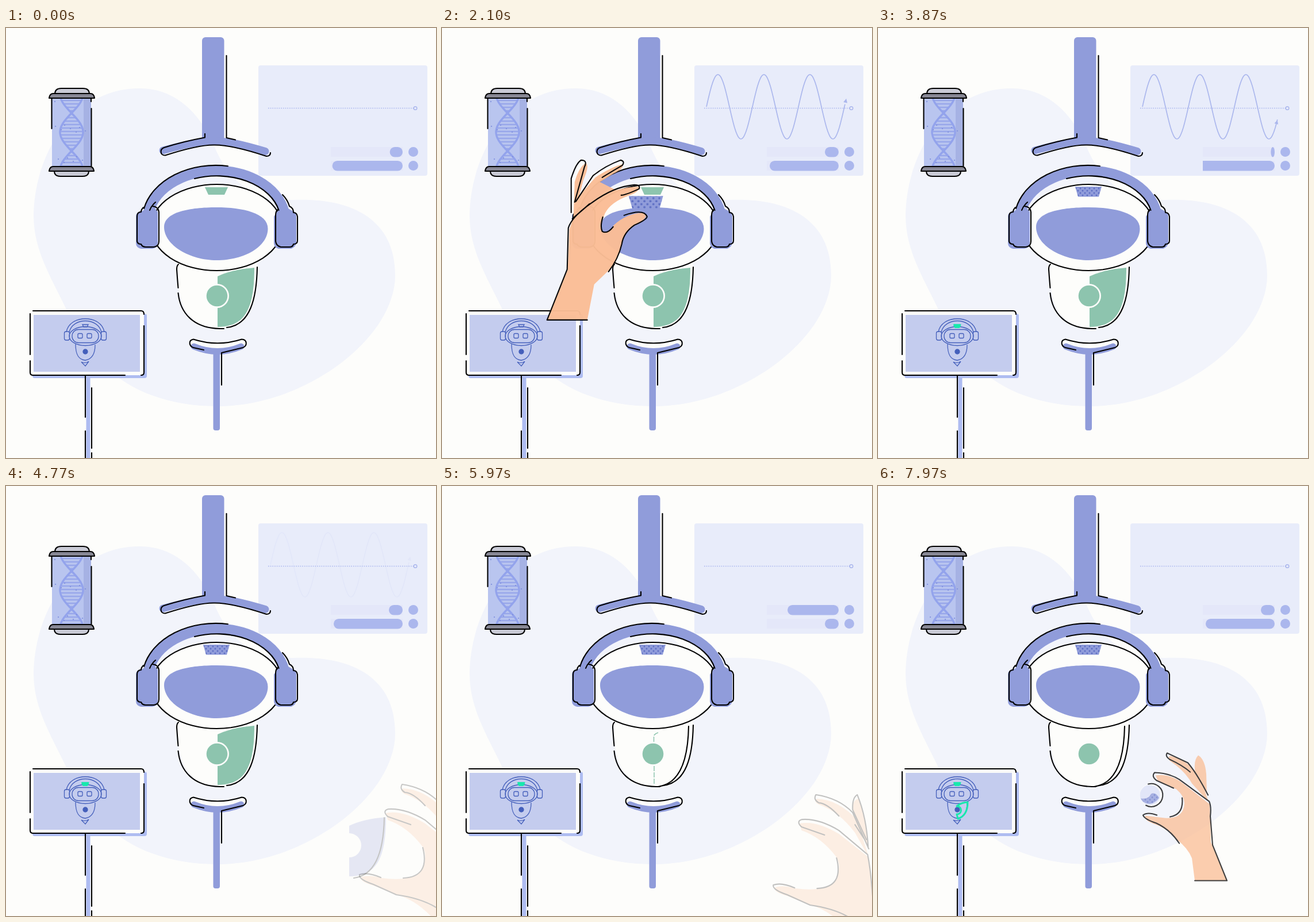
Recreate the animation shown at these times as an HTML page. Size 748 px wide and 748 px high, loop 8 s.

```html
<!DOCTYPE html>
<html lang="en">
<head>
<meta charset="utf-8">
<title>Robot assembly</title>
<style>
  html, body { margin: 0; width: 100%; height: 100%; overflow: hidden; background: #fdfdfb; }
  svg { display: block; width: 100vw; height: 100vh; }
  .ink { fill: none; stroke: #000; stroke-width: 2.1; stroke-linecap: round; stroke-linejoin: round; }
  .blue { fill: #909cda; }
  .band { fill: none; stroke: #909cda; stroke-linecap: round; }
  .green { fill: #8dc4ae; }
  .paper { fill: #fdfdfb; }
  .skin { fill: #fbbe96; }
  .bar { fill: #abb7ed; }
  .track { fill: #e4e7f9; }
  .mini { fill: none; stroke: #445fbb; stroke-width: 1.3; }
  .lit { fill: none; stroke: #18e8ad; stroke-width: 3; stroke-linejoin: round; }
</style>
</head>
<body>
<svg viewBox="0 0 748 748" preserveAspectRatio="none">
  <defs>
    <pattern id="dots" width="8" height="8" patternUnits="userSpaceOnUse">
      <rect width="8" height="8" fill="#909cda"/>
      <circle cx="2" cy="2" r="1.5" fill="#5f70c4"/><circle cx="6" cy="6" r="1.5" fill="#5f70c4"/>
    </pattern>
    <clipPath id="trackClip"><path d="M565 200H690V255H565Z"/></clipPath>
    <clipPath id="glassClip"><path d="M80 122H148V241H80Z"/></clipPath>
  </defs>

  <path fill="#f2f4fb" d="M232 105C296 105 338 150 362 205C384 258 420 300 500 299C590 295 677 325 677 430C677 540 520 658 368 658C230 658 150 590 110 500C80 435 48 390 48 325C50 215 120 105 232 105Z"/>

  <g id="panel">
    <rect x="439" y="65" width="294" height="192" rx="4" fill="#e8ecfa"/>
    <path d="M456 139.5H709" stroke="#abb7ed" stroke-width="1.5" stroke-dasharray="1.7 2"/>
    <circle cx="712" cy="139.5" r="2.8" fill="#e8ecfa" stroke="#abb7ed" stroke-width="1.5"/>
    <g id="wave" fill="none" stroke="#abb7ed" stroke-width="1.7">
      <path id="curve" pathLength="1" stroke-dasharray="1 2"/>
      <path id="arrow" d="M0 -2L-3.5 5H3.5Z" fill="#abb7ed" stroke="none"/>
    </g>
    <path class="track" d="M565 207H690V224H565ZM565 231H690V248H565Z"/>
    <g class="bar" clip-path="url(#trackClip)">
      <rect id="barTop" y="207" height="17.5" rx="8.7"/>
      <rect id="barLow" y="231" height="17.5" rx="8.7"/>
    </g>
    <circle class="bar" cx="708.5" cy="215.5" r="8.5"/>
    <circle class="bar" cx="708.5" cy="239.5" r="8.5"/>
  </g>

  <g id="vial">
    <rect x="80" y="122" width="68" height="119" fill="#b9c5ef"/>
    <rect x="135" y="122" width="13" height="119" fill="#a6b2e4"/>
    <g clip-path="url(#glassClip)">
      <path id="rungs" stroke="#98a7ea" stroke-width="2.3"/>
      <path id="helixA" fill="none" stroke="#93a3ec" stroke-width="3.4"/>
      <path id="helixB" fill="none" stroke="#93a3ec" stroke-width="3.4"/>
      <path id="specks" stroke="#7f8fde" stroke-width="2.2" stroke-linecap="round"/>
    </g>
    <path class="ink" d="M79.500 122V175M148 123V128M148.500 140V240"/>
    <g class="ink">
      <path fill="#c9cad5" d="M85 115Q85 105 96 105H134Q145 105 145 115ZM84 249Q84 258 95 258H133Q144 258 144 249Z"/>
      <path fill="#878794" d="M75 122Q76 114 82 114H147Q153 114 154 122ZM75 249Q76 241 82 241H146Q152 241 153 249Z"/>
    </g>
  </g>

  <g id="lamp">
    <rect class="blue" x="341" y="16" width="38.500" height="182" rx="6"/>
    <path class="band" stroke-width="13" d="M273 213Q335 196 362 196.500Q390 196 451 214.500"/>
    <path class="ink" d="M383.500 48V191L399 194.500M346 184V190.500Q310 197 275 208C267 211 268 222 277 221.500Q335 203 362 203.500Q392 203 453 223Q460 223 460 217"/>
  </g>

  <g id="base">
    <rect class="blue" x="360.500" y="560" width="11.500" height="140" rx="4"/>
    <path class="paper" d="M326 541Q368 555 410 541Q422 546 413 557H326Q315 551 326 541Z"/>
    <path class="band" stroke-width="11" d="M327 554Q368 571 409 554"/>
    <path class="ink" d="M344 560L326 556C318 553 317 543 326 541.500Q368 555 410 541.500C420 542 420 553 412 556L375 565V621"/>
  </g>

  <g id="robot">
    <path class="paper" d="M298 405C298 475 310 523 375 523C425 521 437 475 437 405Z"/>
    <path class="green" id="socket" d="M368 432Q393 420 432 417C432 490 415 520 368 520Z"/>
    <path class="ink" d="M300 411Q297 413 297 420Q298 435 299.500 452M299.500 461C303 495 325 522 372 523L379 523M384 521C425 517 436 470 437 416"/>
    <g id="piece">
      <path id="pieceFill" d="M368 432Q393 420 432 417C432 490 415 520 368 520V487A21 21 0 0 0 368 445Z"/>
      <path class="ink" d="M429 418C428 475 415 518 376 523"/>
    </g>
    <path id="sliver" stroke="#8dc4ae" stroke-width="1.500" stroke-dasharray="9 2" fill="none" d="M376 429Q368 432 368.500 436V446M369 487V520"/>
    <circle class="paper" cx="367" cy="466" r="21"/>
    <circle class="green" cx="367" cy="466" r="18.300"/>

    <path class="band" stroke-width="18" stroke-linecap="butt" d="M247 327A119.500 86.500 0 0 1 485 327"/>
    <ellipse class="ink" cx="366.500" cy="347" rx="114" ry="75" style="fill:#fdfdfb"/>
    <path class="blue" d="M275 346C275 320 320 312 366 312C412 312 455.500 322 455.500 349C455.500 380 415 404 366 404C320 404 275 378 275 346Z"/>
    <path class="green" d="M346 277H386L380 290H352Z"/>
    <rect class="paper" x="228" y="320" width="38" height="60" rx="8"/>
    <rect class="paper" x="469" y="320" width="38" height="60" rx="8"/>
    <path class="blue" d="M238 318L246 311H257L264 320V374Q264 383 254 384H235Q226 382 226 374V326Q228 319 238 318ZM470 322L477 313H489L498 318Q505 320 505 328V374Q504 381 496 384H474Q467 382 466 375V328Z"/>
    <path class="ink" d="M260 303Q253 309 250 317M240 314A128 96 0 0 1 386 240.200M328 262A111 77 0 0 1 474.500 317M481 290Q490 299 493 310M239 312Q235 316 235 320Q228 320 228 328V371Q229 376 235 376Q237 381 243 381H257Q266 380 266 371V320Q265 311 255 310M474 315Q469 318 469 326V371Q470 379 478 381H493Q499 381 500 376Q507 376 507 370V328Q506 321 500 321Q500 313 493 310"/>
  </g>
  <g id="chip"><path fill="url(#dots)" d="M-23 -9H23L18 8.500H-18Z"/></g>

  <g id="screen">
    <path d="M143 606V748" stroke="#aebcf1" stroke-width="7"/>
    <rect x="46" y="497" width="199" height="112" rx="4" fill="#aebcf1"/>
    <rect class="paper" x="42" y="492" width="198" height="112" rx="4"/>
    <rect x="48" y="499" width="185" height="99" fill="#c4ccee"/>
    <path class="ink" d="M47 492H235Q240 492 240 498M240 518V599Q240 604 235 604M207 604H47Q42 604 42 599V579M42 568V497M138 604V677M138 701V748M149 626V731M149 739V748"/>
    <g class="mini">
      <path d="M105 529C110 498 166 498 171 529M110 529C116 503 160 503 166 529"/>
      <rect x="101.500" y="528" width="9" height="15" rx="3"/><rect x="165.500" y="528" width="9" height="15" rx="3"/>
      <ellipse cx="138" cy="536" rx="28" ry="16.500"/><rect x="115" y="524.500" width="46" height="23" rx="11"/>
      <rect x="125" y="531.500" width="8" height="8" rx="2"/><rect x="141" y="531.500" width="8" height="8" rx="2"/>
      <path d="M121 550C121 568 126 577 138 578C150 576 155 566 155 551M133 516H143L141 520H135ZM131 581Q138 584 144 580L138 588Z"/>
      <circle cx="138" cy="563" r="4" fill="#445fbb"/>
    </g>
    <path id="litChip" class="lit" style="fill:#18e8ad" d="M132.500 516.500H143L141 520.500H134.500Z"/>
    <path id="litPiece" class="lit" d="M137 557Q146 550 156 550Q156 573 139 579L137 571A7 7 0 0 0 138 557Z"/>
  </g>

  <g id="hand1">
    <path class="paper" d="M227 325V264L243 231L252 232L240 300L264 257L314 231L317 239L280 262L240 315Z"/>
    <path class="skin" d="M184 508L220 420L223 350L230 328L232 268Q240 240 252 235Q258 240 247 265L240 292L268 260Q295 242 315 237Q319 244 300 253L276 268L304 282Q325 276 343 276Q347 285 325 292Q295 303 285 322Q275 345 281 354Q291 357 300 343Q325 321 352 322Q365 329 335 344Q318 354 314 378Q306 405 294 419L266 446L254 508ZM238 305L270 270L302 282L260 306Z"/>
    <path class="ink" d="M254 508H184L219 420L221 348Q227 328 262 304Q300 276 336 273Q347 273 344 280Q320 291 313 291M226 321V262Q234 236 243 230Q255 230 249 242L232 303M234 302L264 257Q285 240 312 230Q320 232 315 239Q296 250 280 260M228 332L258 306M299 346Q289 359 280 354Q276 345 281 329M318 326Q352 314 358 328Q358 333 336 343Q317 356 314 376Q308 402 291 424"/>
  </g>

  <g id="hand2">
    <path class="skin" d="M740 628L714 562Q713 546 724 543Q735 570 742 625ZM742 645L718 602Q690 565 655 553Q645 547 652 543Q690 545 722 580ZM622 586Q650 580 690 604L742 645C750 700 745 730 760 760L790 828H722Q720 785 700 765Q670 735 640 728L600 712Q577 705 578 698Q590 692 615 699Q660 705 680 690Q697 665 686 645Q660 610 625 598Z"/>
    <path class="ink" d="M738 614L714 562Q713 541 722 536C732 560 739 590 741 628M718 588L735 614M690 573Q670 551 655 550Q645 544 650 536Q690 542 714 567L742 630M665 606L625 592Q615 582 626 579Q655 577 690 598L740 640C752 700 744 730 760 760L790 828H722M652 699Q699 697 686 646M613 698Q590 688 576 693Q574 701 600 710L640 728Q690 735 718 756"/>
  </g>

  <g id="hand3">
    <circle class="paper" cx="476" cy="538" r="20"/>
    <circle fill="#dde2f8" cx="474" cy="538" r="17.500"/>
    <path fill="url(#dots)" d="M458 544Q472 546 476 536Q484 532 490 543Q481 555 470 553Q461 551 458 544Z"/>
    <path class="ink" d="M471 519A20 20 0 1 1 467 556"/>
    <path class="skin" d="M573 537L553 500Q549 478 558 469Q570 476 572 502ZM576 550L547 518Q535 496 509 479Q503 471 510 470Q544 478 563 512ZM484 504Q510 500 533 519L578 554L580 620L608 687H552L547 648Q540 630 520 615Q505 596 480 588Q462 581 466 574L500 578Q532 580 534 553Q534 540 520 528L488 514Z"/>
    <path class="ink" d="M544 498Q530 486 508 476Q500 470 504 465L540 482Q556 501 575 538M515 526L486 513Q476 506 482 499Q510 500 528 513L577 549Q581 558 579 575L583 625L608 687H552M509 576Q533 572 530 543M486 573Q470 567 462 573Q464 580 485 587Q509 598 525 622"/>
  </g>
</svg>
<script>
const LOOP = 8000, PANEL_CYCLE = 2640;
const el = id => document.getElementById(id);
const set = (id, attrs) => { for (const k in attrs) el(id).setAttribute(k, attrs[k]); };
const ramp = (t, start, length) => Math.min(1, Math.max(0, (t - start) / length));
const easeInOut = p => p < .5 ? 2 * p * p : 1 - 2 * (1 - p) ** 2;
const move = (x, y) => `translate(${x.toFixed(2)} ${y.toFixed(2)})`;

function plot(from, to, step, point) {
  const points = [];
  for (let v = from; v <= to; v += step) points.push(point(v).map(n => n.toFixed(1)).join(' '));
  return 'M' + points.join('L');
}

const waveY = x => 137 - 56 * Math.sin((x - 460) * Math.PI / 40);
const spread = y => 20 * Math.cos((y - 181) * Math.PI / 66);

set('curve', { d: plot(460, 701, 1, x => [x, waveY(x)]) });
set('helixA', { d: plot(120, 243, 2, y => [114 + spread(y), y]) });
set('helixB', { d: plot(120, 243, 2, y => [114 - spread(y), y]) });
let rungs = '', specks = '';
for (let y = 126; y < 241; y += 6) rungs += `M${114 - spread(y)} ${y}L${114 + spread(y)} ${y}`;
for (let i = 0; i < 14; i++) specks += `M${85 + i * 37 % 58} ${128 + i * 53 % 108}h.1`;
set('rungs', { d: rungs });
set('specks', { d: specks });

// time within the panel cycle, slider position
const sliderKeys = [[0, -.025], [50, 0], [110, 0], [310, 1], [800, 1], [1200, -.27], [1600, 0], [PANEL_CYCLE, 0]];
function sliderAt(t) {
  const i = sliderKeys.findIndex(k => k[0] > t);
  const [t0, v0] = sliderKeys[i - 1], [t1, v1] = sliderKeys[i];
  return v0 + (v1 - v0) * easeInOut((t - t0) / (t1 - t0));
}

function drawPanel(time) {
  const t = time % PANEL_CYCLE, v = sliderAt(t);
  const drawn = ramp(t, 740, 510), x = 460 + 241 * drawn;
  const heading = Math.atan2(waveY(x + 1) - waveY(x), 1) * 180 / Math.PI + 90;
  set('wave', { opacity: drawn > 0 ? 1 - ramp(t, 2102, 32) : 0 });
  set('curve', { 'stroke-dashoffset': 1 - drawn });
  set('arrow', { transform: `${move(x, waveY(x))} rotate(${heading}) translate(0 -8)` });
  for (const [id, w] of [['barTop', 24 + 65 * v], ['barLow', 120 - 96 * v]])
    set(id, { x: 690 - w, width: w });
}

const hands = [
  { id: 'hand1', start: 1635, leave: 2720, dock: [10, -19], from: [-200, 335], to: [-243, 372] },
  { id: 'hand2', start: 4690, leave: 5720, dock: [-190, -176], from: [239, 166], to: [215, 200] },
  { id: 'hand3', start: 7680, leave: 8700, dock: [-108, -72], from: [232, 155], to: [215, 200] }
];

function drawHand(hand, t) {
  const away = 1 - easeInOut(ramp(t, hand.start, 560)), gone = ramp(t, hand.leave, 330);
  const back = easeInOut(gone), shown = ramp(t, hand.start, 375);
  const offset = i => hand.from[i] * away + hand.to[i] * back;
  set(hand.id, {
    transform: move(hand.dock[0] + offset(0), hand.dock[1] + offset(1)),
    opacity: .97 * shown * (1 - gone)
  });
  return { x: hand.from[0] * away, y: hand.from[1] * away, opacity: shown };
}

function draw(t) {
  drawPanel(t);
  const [chip, piece] = hands.map(hand => drawHand(hand, t));
  const scale = 1.3 - .3 * ramp(t, 2195, 960);
  set('chip', { transform: `${move(366 + chip.x, 285 + chip.y)} scale(${scale})`, opacity: chip.opacity });

  const white = ramp(t, 5250, 200), mix = (a, b) => Math.round(a + (b - a) * white);
  set('piece', { transform: move(piece.x, piece.y), opacity: piece.opacity });
  set('pieceFill', { fill: `rgb(${mix(144, 253)},${mix(156, 253)},${mix(218, 251)})` });
  set('socket', { opacity: t < 5450 ? 1 : 0 });
  set('sliver', { opacity: t >= 5450 && t < 6100 ? 1 : 0 });

  set('litChip', { opacity: ramp(t, 3150, 200) });
  set('litPiece', { opacity: ramp(t, 6200, 200) });
}

function tick() {
  draw(performance.now() % LOOP);
  requestAnimationFrame(tick);
}
tick();
</script>
</body>
</html>
```
